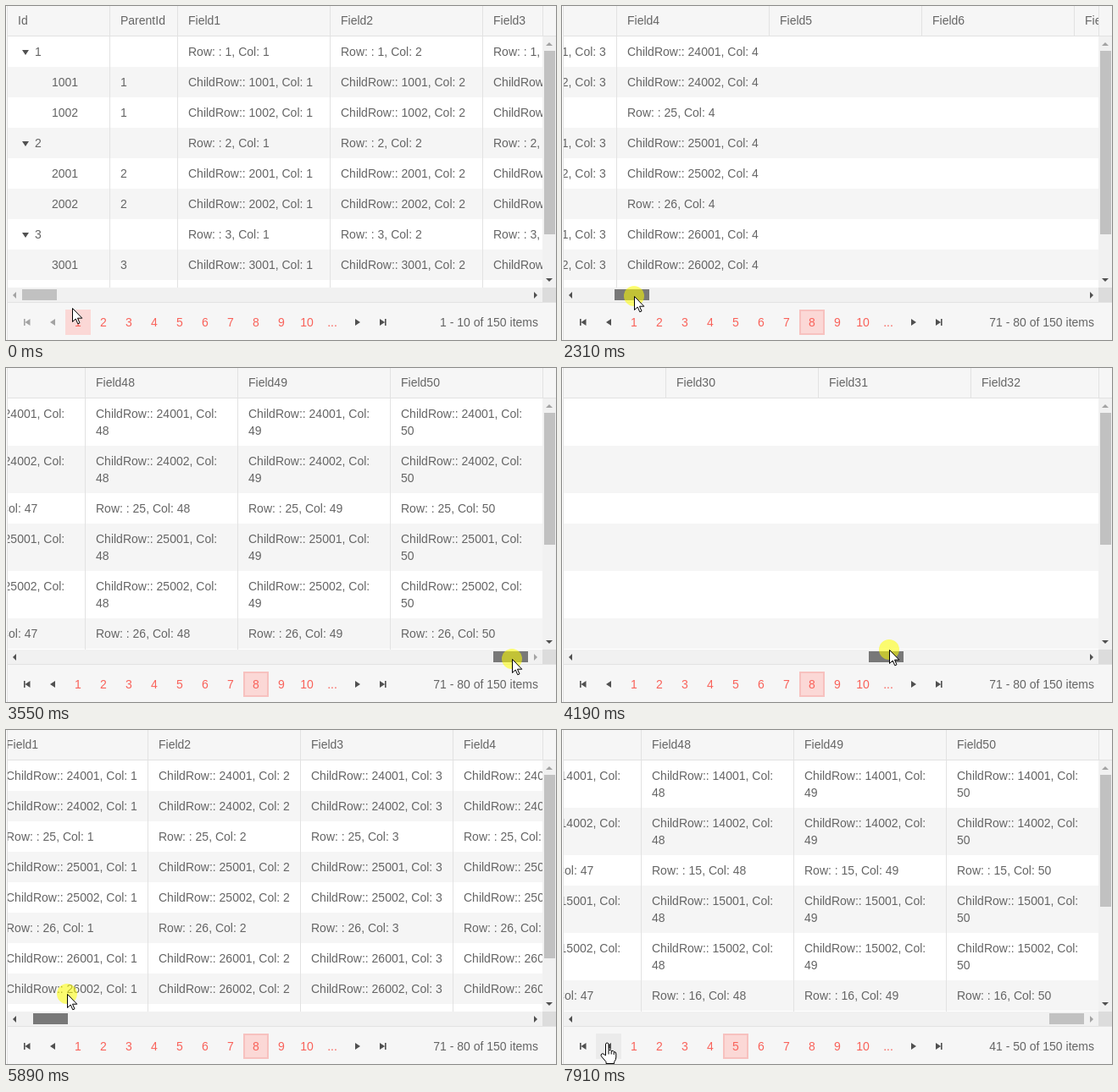
Write an HTML page that moves like this. It is 649 by 395 pixels and loops after 7990 ms.

```html
<!DOCTYPE html>
<html lang="en">
<head>
<meta charset="utf-8">
<title>Tree list with virtual columns</title>
<style>
  html, body { margin: 0; width: 100%; height: 100%; overflow: hidden; background: #fff; }
  #stage { position: relative; width: 649px; height: 395px; overflow: hidden; background: #fff;
    font: 14px/20px "Liberation Sans", Arial, sans-serif; color: #656565; }
  #stage div, #stage span, #stage svg { position: absolute; box-sizing: border-box; }
  #header { left: 1px; top: 0; width: 648px; height: 36px; background: #f6f6f6; border-bottom: 1px solid #e2e2e2; }
  #headClip { left: 2px; top: 0; width: 632px; height: 35px; overflow: hidden; border-right: 1px solid #e2e2e2; }
  #body { left: 2px; top: 36px; width: 631px; height: 297px; overflow: hidden; }
  .row { left: 0; width: 100%; }
  .row.alt { background: #f5f5f5; }
  .track { left: 0; top: 0; height: 100%; }
  .cell { top: 0; height: 100%; padding: 8px 0 0 12px; border-left: 1px solid #e2e2e2; white-space: pre; }
  #headClip .cell { padding-top: 7px; }
  .cell i { position: absolute; left: 17px; top: 16px; border: solid transparent; border-width: 6px 4px 0; border-top-color: #515151; }
  #vbar { left: 633px; top: 36px; width: 16px; height: 297px; background: #f1f1f1; }
  #hbar { left: 2px; top: 333px; width: 631px; height: 17px; background: #f1f1f1; }
  #corner { left: 633px; top: 333px; width: 16px; height: 17px; background: #dcdcdc; }
  #vthumb { left: 635px; top: 53px; width: 13px; background: #c1c1c1; }
  #hthumb { top: 335px; width: 41px; height: 13px; background: #c1c1c1; }
  #hthumb.held { background: #787878; }
  #pager { left: 1px; top: 350px; width: 648px; height: 45px; background: #f6f6f6; border-top: 1px solid #e2e2e2; }
  #edge { left: 1px; top: 0; width: 1px; height: 395px; background: #e2e2e2; }
  .btn { top: 359px; width: 30px; height: 30px; line-height: 30px; text-align: center; color: #f9625a; }
  .btn.hover { background: #ebebeb; }
  .btn.on { background: #fbd8d6; }
  .btn.focus { box-shadow: inset 0 0 0 2px #f7c1bf; }
  #info { right: 21px; top: 364px; }
  #overlay { left: 0; top: 0; }
  .icon { fill: #505050; }
  .icon.off { fill: #a3a3a3; }
  .pointer { fill: #fff; stroke: #000; stroke-width: 1; stroke-linejoin: round; }
</style>
</head>
<body>
<div id="stage">
  <div id="header"></div>
  <div id="headClip"><div class="track" id="headTrack"></div></div>
  <div id="body"></div>
  <div id="vbar"></div><div id="hbar"></div><div id="corner"></div>
  <div id="vthumb"></div><div id="hthumb"></div>
  <div id="pager"></div><div id="edge"></div>
  <div id="buttons"></div>
  <span id="info"></span>
  <svg id="overlay" width="649" height="395">
    <path class="icon off" d="M637 47h8l-4-4z"/>
    <path class="icon" d="M637 322h8l-4 4z"/>
    <path class="icon" id="left" d="M12 338v8l-4-4z"/>
    <path class="icon" id="right" d="M623 338v8l4-4z"/>
    <path class="icon" id="first" d="M21 370h1.6v8H21zM28.5 370v8l-6-4z"/>
    <path class="icon" id="prev" d="M58 370v8l-6-4z"/>
    <path class="icon" d="M412 370v8l6-4z"/>
    <path class="icon" d="M441 370v8l6-4zM447 370h1.6v8H447z"/>
    <g id="mouse">
      <circle id="halo" r="12" fill="#ff0" fill-opacity=".55"/>
      <path id="arrow" class="pointer" d="M.5.5V16.5L4.2 13 6.8 18.8 9 17.8 6.5 12.2H11.8Z"/>
      <path id="hand" class="pointer" d="M-1.5 13.5V1Q-1.5-1 .2-1T2 1V7.5Q5 6.8 5.2 8.5 8 7.8 8.2 9.6 10.8 9.2 10.8 12V16Q10.8 19 8.6 21.5V23.5H-1V21.5L-6.6 14.8Q-7.8 12.6-5.8 11.8-4 11.4-1.5 14ZM2 8V12.5M5.2 8.8V12.5M8.2 10V13"/>
    </g>
  </svg>
</div>
<script>
const LOOP = 7990, STEP = 77, FIELDS = 50, VIEW = 631, MAX_SCROLL = 8569, PAGE_SIZE = 10;
const $ = id => document.getElementById(id);

// [time, value] lists hold each value until the next time
const scrolls = [[0, 0],
  [2230, 324], [2310, 678], [2390, 1834], [2465, 3020], [2540, 4192], [3240, 6365], [3320, MAX_SCROLL],
  [4110, 6920], [4185, 5300], [4260, 3668], [4335, 2050], [4410, 431], [5040, 60], [5110, 0],
  [5890, 215], [5967, 2650], [6044, 4839], [6121, 7027], [6198, MAX_SCROLL]];
const renders = [0, 2690, 3550, 4640, 5280, 6350].map(t => [t, hold(scrolls, t)]);
const pages = [[0, 1], [540, 4], [1230, 8], [7530, 5]];
const presses = [[0, 0], [462, 1], [620, 0], [1160, 1], [1300, 0], [2080, 1], [6750, 0], [7530, 1], [7610, 0]];

// [start, steps, x, y]
const moves = [[0, 1, 78, 357], [70, 6, 172, 373], [620, 8, 297, 374], [1620, 7, 42, 343],
  [2230, 2, 85, 343], [2390, 3, 314, 343], [3240, 2, 597, 344], [4110, 5, 69, 316],
  [5040, 2, 12, 322], [5890, 1, 72, 312], [5967, 4, 640, 310], [6750, 8, 205, 374], [7610, 4, 53, 371]];

function hold(list, t) {
  let value;
  for (const [start, v] of list) if (t >= start) value = v;
  return value;
}

function mouseAt(t) {
  let x = 78, y = 357;
  for (const [start, steps, toX, toY] of moves) {
    if (t < start) break;
    const p = Math.min(1, (Math.floor((t - start) / STEP) + 1) / steps);
    x += (toX - x) * p;
    y += (toY - y) * p;
  }
  return [Math.round(x), Math.round(y)];
}

// Columns: 0 is Id, 1 is ParentId, the rest are numbered fields
const colLeft = c => c === 0 ? -1 : c === 1 ? 120 : 200 + 180 * (c - 2);
const colTitle = c => c === 0 ? 'Id' : c === 1 ? 'ParentId' : 'Field' + (c - 1);
const cell = (c, html) =>
  `<span class="cell" style="left:${colLeft(c)}px;width:${colLeft(c + 1) - colLeft(c)}px">${html}</span>`;

function cellHtml(index, c) {
  const parent = Math.floor(index / 3) + 1, child = index % 3;
  const id = child ? parent * 1000 + child : parent;
  if (c === 0) return child ? `<span style="left:52px">${id}</span>` : `<i></i><span style="left:32px">${id}</span>`;
  if (c === 1) return child ? parent : '';
  const text = `${child ? 'ChildRow:' : 'Row: '}: ${id}, Col: ${c - 1}`;
  return text.length > 24 ? text.replace(/ (\d+)$/, '\n$1') : text;
}

function renderRows(page, scroll) {
  const cols = [...Array(FIELDS + 2).keys()];
  const visible = cols.filter(c => colLeft(c + 1) > scroll && colLeft(c) < scroll + VIEW);
  const next = visible[visible.length - 1] + 1;
  if (next < cols.length) visible.push(next);
  let top = 0, rows = '';
  for (let i = 0; i < PAGE_SIZE; i++) {
    const cells = visible.map(c => cell(c, cellHtml((page - 1) * PAGE_SIZE + i, c))).join('');
    const height = cells.includes('\n') ? 56 : 36;
    rows += `<div class="row${i % 2 ? ' alt' : ''}" style="top:${top}px;height:${height}px"><div class="track">${cells}</div></div>`;
    top += height;
  }
  $('body').innerHTML = rows;
  $('vthumb').style.height = Math.round(263 * 297 / top) + 'px';
}

$('headTrack').innerHTML = [...Array(FIELDS + 2).keys()].map(c => cell(c, colTitle(c))).join('');
$('buttons').innerHTML = [...Array(15).keys()].map(i => {
  const label = i === 12 ? '...' : i > 1 && i < 12 ? i - 1 : '';
  return `<div class="btn" style="left:${10 + 30 * i}px">${label}</div>`;
}).join('');
const buttons = [...$('buttons').children];

let lastRows = '';
function frame() {
  const t = performance.now() % LOOP;
  const scroll = hold(scrolls, t), rendered = hold(renders, t), page = hold(pages, t);
  const pressed = hold(presses, t), [x, y] = mouseAt(t);

  const rowsKey = page + '|' + rendered;
  if (rowsKey !== lastRows) renderRows(page, rendered);
  lastRows = rowsKey;
  for (const track of document.querySelectorAll('.track')) track.style.left = -scroll + 'px';

  $('hthumb').style.left = 19 + Math.floor(scroll * 0.06489) + 'px';
  $('hthumb').classList.toggle('held', t >= 2080 && t < 6750);
  $('left').classList.toggle('off', scroll === 0);
  $('right').classList.toggle('off', scroll === MAX_SCROLL);

  const under = y >= 359 && y < 389 ? Math.floor((x - 10) / 30) : -1;
  buttons.forEach((b, i) => {
    b.classList.toggle('on', i === page + 1);
    b.classList.toggle('focus', i === page + 1 && page > 1);
    b.classList.toggle('hover', i === under);
  });
  for (const id of ['first', 'prev']) $(id).classList.toggle('off', page === 1);
  $('info').textContent = `${(page - 1) * PAGE_SIZE + 1} - ${page * PAGE_SIZE} of 150 items`;

  const link = under >= 0 && under < buttons.length && under !== page + 1;
  $('mouse').setAttribute('transform', `translate(${x} ${y})`);
  $('halo').style.display = pressed ? '' : 'none';
  $('arrow').style.display = link ? 'none' : '';
  $('hand').style.display = link ? '' : 'none';
  requestAnimationFrame(frame);
}
frame();
</script>
</body>
</html>
```
